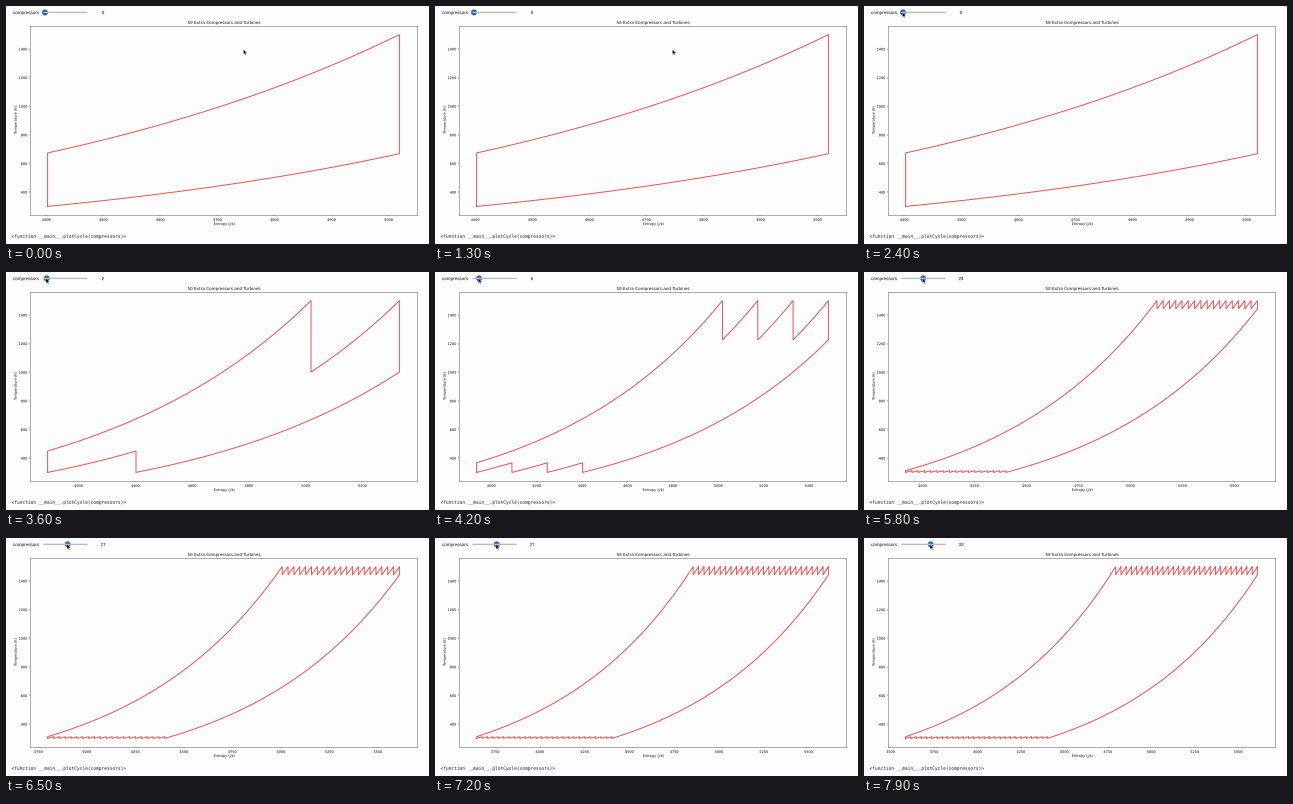
Animation, 423 px wide and 238 px high, one loop 8 s. Source, as a matplotlib script:

```python
import numpy as np
import matplotlib.pyplot as plt
from matplotlib.animation import FuncAnimation
from matplotlib.patches import Circle, Polygon
from matplotlib.patheffects import Normal
from matplotlib.ticker import MaxNLocator

WIDTH, HEIGHT, DPI = 423, 238, 64
STEP_MS, LOOP_MS = 100, 8000
PAPER = "#fdfdfd"
T_MIN, T_MAX = 300, 1500
S_REF, HEAT_CAP = 4402.6, 770
DRAG_START, REPLOT_SPEED = 2900, 5 / 7


def px(size):
    """Pixels to points."""
    return size * 72 / DPI


def slider_value(ms):
    """One long drag, a rest, then a short drag at the end."""
    first = np.interp(ms, [DRAG_START, 3600, 4200, 4500, 6110], [0, 2, 6, 11.7, 27])
    second = np.interp(ms, [7500, 7900], [0, 6])
    return int(first + second)


def plotted_value(ms):
    """The plot replays the drag more slowly than the hand moves."""
    return slider_value(DRAG_START + (ms - DRAG_START) * REPLOT_SPEED)


def stage_ratio(stages):
    """Temperature ratio of one stage, coarsely rounded for many stages."""
    exact = 2.245 ** (1 / stages)
    return exact if stages <= 4 else 1.04 + 0.05 * round((exact - 1.04) / 0.05)


def cycle(stages):
    ratio = stage_ratio(stages)
    entropy, temp = [], []

    def isobar(s, start, end):
        t = np.linspace(start, end, 50)
        entropy.extend(s + HEAT_CAP * np.log(t / start))
        temp.extend(t)
        return entropy[-1]

    s = left = S_REF - (stages - 1) * HEAT_CAP * np.log(ratio)
    for _ in range(stages - 1):
        s = isobar(s, T_MIN, T_MIN * ratio)
    s = isobar(s, T_MIN, T_MAX / ratio)
    for _ in range(stages - 1):
        s = isobar(s, T_MAX, T_MAX / ratio)
    isobar(s, T_MAX, T_MIN * ratio)
    return np.append(entropy, left), np.append(temp, T_MIN)


# A path effect draws text as outlines, which keeps tiny glyphs evenly spaced.
plt.rcParams.update({"font.family": "DejaVu Sans", "path.effects": [Normal()],
                     "axes.linewidth": px(0.6), "axes.edgecolor": "#777777"})
fig = plt.figure(figsize=(WIDTH / DPI, HEIGHT / DPI), dpi=DPI, facecolor=PAPER)

ax = fig.add_axes([24 / WIDTH, 1 - 209 / HEIGHT, 387 / WIDTH, 189 / HEIGHT],
                  facecolor=PAPER)
ax.tick_params(length=px(1.2), width=px(0.4), pad=px(1.7), labelsize=px(3.44))
for axis in (ax.xaxis, ax.yaxis):
    axis.set_major_locator(MaxNLocator(9, steps=[1, 2, 2.5, 5, 10]))
    axis.set_major_formatter("{x:.0f}")
ax.set_ylim(T_MIN - 60, T_MAX + 60)
line, = ax.plot([], [], color="#e85555", lw=px(1), snap=False)

page = fig.add_axes([0, 0, 1, 1])
page.set(xlim=(0, WIDTH), ylim=(HEIGHT, 0))
page.axis("off")


def label(x, y, text, size, ha="center", **style):
    return page.text(x, y, text, fontsize=px(size), ha=ha, color="#111111",
                     **{"va": "center", **style})


label(218, 17, "50 Extra Compressors and Turbines", 4.12)
label(218, 218, "Entropy (J/k)", 3.44)
label(9.7, 114.5, "Temperature (K)", 3.44, rotation=90)
label(7, 8.1, "compressors", 4.55, ha="left", va="baseline", family="Liberation Sans")
label(5.5, 231.8, "<function __main__.plotCycle(compressors)>", 4.53, ha="left",
      va="baseline", family="DejaVu Sans Mono")
readout = label(97, 8.1, "0", 4.55, va="baseline", family="Liberation Sans")

page.plot([38, 81], [6.4, 6.4], color="#bcbcbc", lw=px(1.4),
          solid_capstyle="round", snap=False)
handle = page.add_patch(Circle((39, 6.4), 2.8, fc="#2163b8", ec="#1c549c", lw=px(0.3)))
ARROW = np.array([(0, 0), (0, 5.2), (1.2, 4.2), (2, 6), (2.8, 5.6), (2, 3.9), (3.6, 3.8)])
cursor = page.add_patch(Polygon(ARROW, fc="black", ec="white", lw=px(0.3)))


def draw(frame):
    ms = frame * STEP_MS
    count = slider_value(ms)
    knob = 39 + 0.84 * count
    handle.center = (knob, 6.4)
    readout.set_text(str(count))

    glide = np.clip((ms - 1500) / 800, 0, 1)
    glide = glide * glide * (3 - 2 * glide)
    tip = np.array([237.5, 43.3]) * (1 - glide) + np.array([knob - 0.7, 6]) * glide
    cursor.set_xy(ARROW + tip)

    s, t = cycle(plotted_value(ms) + 1)
    line.set_data(s, t)
    margin = 0.05 * np.ptp(s)
    ax.set_xlim(s.min() - margin, s.max() + margin)
    return line, handle, readout, cursor


anim = FuncAnimation(fig, draw, frames=LOOP_MS // STEP_MS, interval=STEP_MS,
                     repeat=True, repeat_delay=0, blit=False)
plt.show()
```
